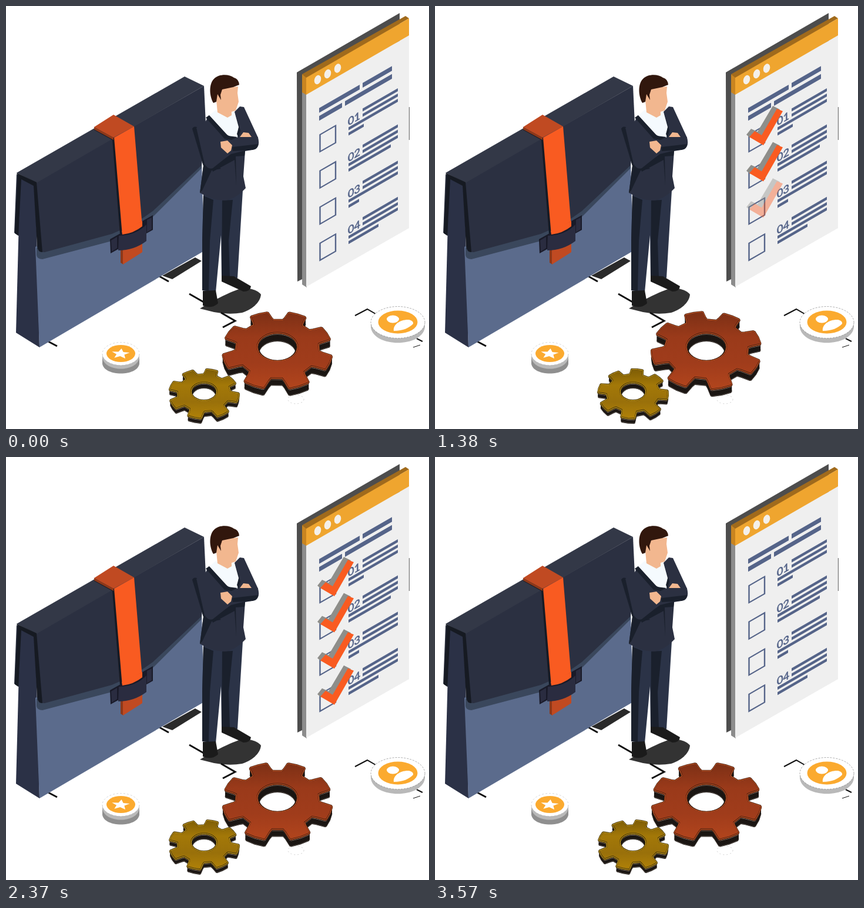
An HTML page with a canvas that plays this animation: 720 by 720 pixels, repeating every 3600 ms.

```html
<!DOCTYPE html>
<html lang="en">
<head>
<meta charset="utf-8">
<title>Business checklist</title>
<style>
  html, body { margin: 0; width: 100%; height: 100%; overflow: hidden; background: #fff; }
  svg, canvas { position: absolute; left: 0; top: 0; width: 720px; height: 720px; }
  text { font: 18px Lato, sans-serif; fill: #556489; stroke: #556489; stroke-width: .7; }
</style>
</head>
<body>
<svg viewBox="0 0 720 720">
  <!-- ground shadows and brackets -->
  <path fill="#2a2a2a" d="M266 459 322 428 333 434 283 465Z"/>
  <path fill="#333" d="M330 515C352 502 385 484 404 480Q426 481 434 491C433 504 420 516 402 522Q380 526 354 521Z"/>
  <g fill="none" stroke="#111" stroke-width="3">
    <path d="M261 460 277 469M70 570 87 579M312 490 340 506M366 522 390 536 369 547"/>
    <path stroke-width="2" d="M594 527 615 516 629 524M699 566 709 571"/>
    <path stroke-width="1" d="M693 581 705 577"/>
    <ellipse cx="493.5" cy="669.5" rx="13.5" ry="7.5" stroke="#bbb" stroke-width=".7" stroke-dasharray="2 4"/>
  </g>

  <!-- briefcase -->
  <path fill="#252a38" d="M18 286 24 290 22 391 14 386Z"/>
  <path fill="#2b3146" d="M24 290 50 302 57 581 17 556Z"/>
  <path fill="#5b6b8c" d="M50 410 333 262 337 417 57 581Z"/>
  <path fill="#3a475c" d="M52 412 333 262V276L252 357Q225 380 180 400L62 431Q53 431 52 424Z"/>
  <path fill="#2b3041" d="M51 300 337 136 340 200 333 271 250 349Q218 373 180 388L66 419Q60 420 58 412Z"/>
  <path fill="#333847" d="M18 284 304 120 337 136 52 301Z"/>
  <path fill="#161a22" d="M18 284 52 300 62 419Q54 419 53 409L47 306 26 295 21 391 15 387 20 288Z"/>
  <path fill="#161a24" d="M150 206 185 224 200 391 194 388 181 228 150 211Z"/>
  <path fill="#8d3819" d="M150 206 183 224V228L150 210ZM195 412 200 414V440L195 437Z"/>
  <path fill="#c04a22" d="M150 206 183 185 218 205 183 224ZM199 412 232 395V419L199 440Z"/>
  <path fill="#f95b21" d="M184 224 218 205 232 376 198 391Z"/>
  <path fill="#191a28" d="M177 397 250 356V381L178 421Z"/>
  <path fill="#2a2c40" d="M192 391Q222 390 239 372V400Q218 416 191 416ZM179 399 189 393V412L180 418ZM240 364 248 360V380L240 385Z"/>
  <path fill="#f95b21" d="M197 383 232 366V375Q217 387 198 389Z"/>

  <!-- man -->
  <path fill="#2b3347" d="M336 320 403 314 394 463 367 461 366 390 357 487 334 484V400Z"/>
  <path fill="#1a202c" d="M336 323 353 330 347 400 345 485 334 484V400ZM368 331 386 330 379 400 381 462 367 461Z"/>
  <path fill="#1b1b1b" d="M335 485 357 484 361 506Q351 516 335 510ZM367 459 388 460 417 477Q416 486 404 486L367 469Z"/>
  <path fill="#f5fafe" d="M345 187 357 177 378 189 388 179 395 190 396 228 380 224Z"/>
  <path fill="#f2b78f" d="M357 150 368 140 395 137 394 148 396 163 391 178 384 180V186L377 190 360 181Z"/>
  <path fill="#31170d" d="M353 165C346 153 345 133 354 124C363 115 380 116 388 122Q396 124 397 134L387 138 368 142 365 151 366 160 360 150 358 163Z"/>
  <path fill="#2b3041" d="M345 186Q372 226 394 224L396 206 389 180 398 171 405 172 429 224Q433 239 424 244L407 247 404 290 408 310Q390 329 372 331 352 331 330 318L336 272 317 212Q317 206 324 205L340 196Z"/>
  <path fill="#1a202c" d="M317 209Q319 204 325 206L345 258 366 277 350 280 334 314 330 318 336 272ZM340 190 346 186 378 221 394 223 384 228 372 226ZM389 180 397 203 393 218 396 224 399 212ZM350 276 383 252 407 246 406 255 391 256 392 305 389 262 352 282Z"/>
  <path fill="#2b3041" d="M324 207Q342 201 347 207L366 231 376 248 364 258 386 246 382 252 352 276Q344 279 338 269Z"/>
  <path fill="#1a202c" d="M385 238 429 232Q430 243 420 245L386 247Z"/>
  <path fill="#2b3041" d="M384 228 400 222 429 223V235L385 240Z"/>
  <path fill="#f2b78f" d="M365 231 377 229 385 237 383 246 377 251 366 241ZM398 223 404 215 413 216 418 223Z"/>

  <!-- checklist sheet -->
  <path fill="#4d4d4d" d="M495 113 670 12V60L506 130V464L496 469Z"/>
  <path fill="#8c8c8c" d="M504 118 512 122V479L504 474Z"/>
  <path fill="#efefef" d="M511 150 686 50V378L511 478Z"/>
  <path fill="#a06a1c" d="M504 116 680 17 686 21 511 123Z"/>
  <path fill="#c88420" d="M504 116 511 122V151L504 147Z"/>
  <path fill="#efa52f" d="M511 122 686 21V50L511 151Z"/>
  <path stroke="#333" stroke-width=".8" d="M686.4 172V228"/>
  <g fill="#f4f0ea">
    <ellipse cx="530.5" cy="125.5" rx="5.5" ry="8" transform="rotate(18 530.5 125.5)"/>
    <ellipse cx="547.5" cy="115.5" rx="5.5" ry="8" transform="rotate(18 547.5 115.5)"/>
    <ellipse cx="564.5" cy="106" rx="5.5" ry="8" transform="rotate(18 564.5 106)"/>
  </g>
  <g id="sheet" transform="matrix(1 -.577 0 1 511 150)" fill="#556489">
    <path d="M22 36.5H91V44.5H22ZM96 36.5H146V44.5H96ZM22 50H61V58H22ZM66 50H146V58H66Z"/>
  </g>
  <g id="checks"></g>

  <!-- star coin -->
  <path fill="#8f8f8f" d="M164 592H227V609C224 631 167 631 164 609Z"/>
  <path fill="#b9b9b9" d="M164 592H227V598C224 624 167 624 164 598Z"/>
  <ellipse cx="195.5" cy="592" rx="31.5" ry="19.5" fill="#fff" stroke="#bbb" stroke-width=".6" stroke-dasharray="3 3"/>
  <ellipse cx="195.5" cy="591.5" rx="24.5" ry="14.5" fill="#fbaa2f"/>
  <path id="star" fill="#fff"/>

  <!-- user coin -->
  <path fill="#b9b9b9" d="M621 541H713V547C708 582 626 582 621 547Z"/>
  <ellipse cx="667" cy="538.5" rx="46" ry="27" fill="#fff" stroke="#888" stroke-width=".7" stroke-dasharray="3 2"/>
  <ellipse cx="667" cy="538" rx="33.5" ry="19.5" fill="#fbaa2f"/>
  <ellipse cx="658.5" cy="533" rx="10.5" ry="6.5" fill="#fff"/>
  <path fill="#fff" d="M660 553C658 542 672 533 686 534Q694 536 693 541C686 548 676 553 660 553Z"/>
</svg>
<canvas id="gears" width="720" height="720"></canvas>

<script>
const LOOP = 3600, STEP = 30, PITCH = 61.6;
const $ = id => document.getElementById(id);
const ctx = $('gears').getContext('2d');

// Checklist rows
[26, 72, 18, 51].forEach((lastWidth, i) => {
  const bar = (x, y, w) => `<rect x="${x}" y="${y}" width="${w}" height="5"/>`;
  $('sheet').innerHTML += `<g transform="translate(0 ${i * PITCH})">
    <rect x="23.5" y="82.5" width="26.5" height="29" fill="none" stroke="#556489" stroke-width="2.4"/>
    <text x="71" y="95">0${i + 1}</text>
    ${bar(96, 80, 60)}${bar(96, 89, 60)}${bar(72, 98, 84)}${bar(72, 107, lastWidth)}</g>`;
  $('checks').innerHTML += `<g transform="translate(0 ${i * PITCH})">
    <path fill="#8e8e8a" d="M530 219 538 209 549 214 575 170 587 176 556 224 536 224Z"/>
    <path fill="#f95b21" d="M535 223 544 213 556 220 582 175 592 179 559 237Z"/></g>`;
});
const checks = [...$('checks').children];

const starPoint = (_, i) => {
  const a = i * Math.PI / 5 + .1, r = i % 2 ? 7 : 16;
  return [195 + r * Math.sin(a), 592 - r * .57 * Math.cos(a)];
};
$('star').setAttribute('d', 'M' + Array.from({ length: 10 }, starPoint).join(' ') + 'Z');

const gears = [
  { x: 337, y: 656, size: 59.5, depth: 9, phase: 14.5, dir: -1,
    face: ['#7d5c05', '#a37808', '#99700a', '#b08108'], rim: '#e3b62c', dark: '#3c2b04' },
  { x: 462, y: 580, size: 93.5, depth: 13, phase: -21.5, dir: 1,
    face: ['#7b2f15', '#9a3a1a', '#a03c1b', '#b2451d'], rim: '#e0672f', dark: '#43180a' }
];

// Outline of an eight-toothed wheel lying on the ground in mild perspective
function gearPath({ x, y, size }, turn, hole) {
  const path = new Path2D();
  const point = (r, deg) => {
    const a = deg * Math.PI / 180, depth = 1 + .095 * r * Math.cos(a);
    return [x + size * r * Math.sin(a) / depth, y - size * .703 * r * Math.cos(a) / depth];
  };
  for (let tooth = 0; tooth < 8; tooth++) {
    const mid = turn + tooth * 45;
    for (const [r, a] of [[.76, -15.5], [.82, -13.5], [.985, -10.8], [1, -9.3], [1, 0], [1, 9.3], [.985, 10.8], [.82, 13.5], [.76, 15.5]])
      path.lineTo(...point(r, mid + a));
  }
  path.closePath();
  path.moveTo(x + size * hole, y);
  path.ellipse(x, y, size * hole, size * hole * .7, 0, 0, 2 * Math.PI);
  return path;
}

function drawGear(gear, progress) {
  const turn = gear.phase + gear.dir * 135 * progress;
  const path = gearPath(gear, turn, .365), side = gearPath(gear, turn, .335);
  const { y, size, depth } = gear;
  const stroke = (shape, dy, color, width) => {
    ctx.save();
    ctx.translate(0, dy);
    ctx.strokeStyle = color;
    ctx.lineWidth = width;
    ctx.stroke(shape);
    ctx.restore();
  };
  ctx.lineJoin = 'round';
  ctx.fillStyle = '#1b1613';
  for (let dy = depth; dy > 0; dy--) {
    ctx.save();
    ctx.translate(0, dy);
    ctx.fill(side, 'evenodd');
    ctx.restore();
    if (dy === depth - 1) stroke(side, dy, '#6b625b', .7);
  }
  stroke(path, 2.5, '#d8c3b0', .7);
  stroke(path, 1, gear.dark, 2.4);
  const paint = ctx.createLinearGradient(0, y - size * .65, 0, y + size * .77);
  gear.face.forEach((color, i) => paint.addColorStop(i / 3, color));
  ctx.fillStyle = paint;
  ctx.fill(path, 'evenodd');
  stroke(path, 0, gear.dark, 2.2);
  stroke(path, .4, gear.rim, 1);
}

const ramp = (t, start, length) => Math.min(1, Math.max(0, (t - start) / length));

function frame(now) {
  const t = Math.floor(now % LOOP / STEP) * STEP;
  checks.forEach((check, i) => {
    check.style.opacity = ramp(t, i * 600, 430) * (1 - ramp(t, 3190, 370));
  });
  ctx.clearRect(0, 0, 720, 720);
  gears.forEach(gear => drawGear(gear, t / LOOP));
  requestAnimationFrame(frame);
}
requestAnimationFrame(frame);
</script>
</body>
</html>
```
